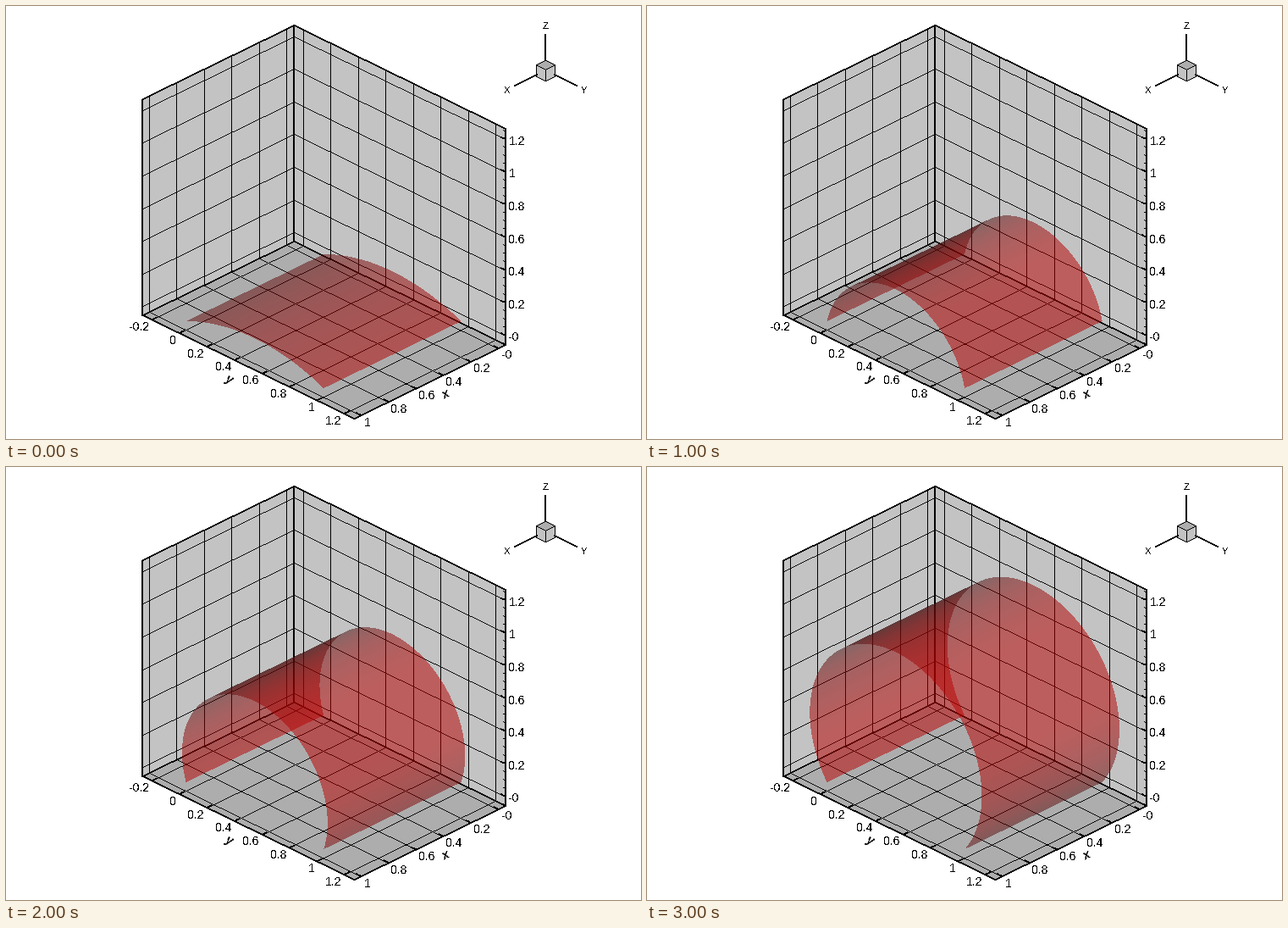
Animation, 750 px wide and 511 px high, one loop 4000 ms. Source, as a matplotlib script:

```python
import itertools

import numpy as np
import matplotlib.pyplot as plt
from matplotlib.animation import FuncAnimation

W, H, DPI = 750, 511, 100
PX = 72 / DPI
WALL, FLOOR = "#c3c3c3", "#adadad"

# Axonometric view: screen pixels per unit along each axis.
SX, SY, SZ = 162.5, 79.1, 193.0
AXES = np.array([[-SX, SY], [SX, SY], [0, -SZ]])
LOW = np.array([-0.053, -0.266, -0.056])
HIGH = np.array([1.0485, 1.2725, 1.265])
CORNER = np.array([340, 278])
TRIAD = np.array([637, 76])
STEP = 0.2


def project(point):
    return CORNER + (np.asarray(point) - LOW) @ AXES


fig = plt.figure(figsize=(W / DPI, H / DPI), dpi=DPI, facecolor="white")
ax = fig.add_axes([0, 0, 1, 1])
ax.axis("off")
ink = np.zeros((H, W), bool)


def line(start, end, width=1):
    """Mark a hard-edged line, thickened across its minor direction."""
    start, end = np.rint(start), np.rint(end)
    span = np.abs(end - start)
    cells = np.rint(np.linspace(start, end, int(span.max()) + 1)).astype(int)
    across = np.array([0, 1] if span[0] >= span[1] else [1, 0])
    for k in range(width):
        x, y = (cells - k * across).T
        ink[y, x] = True


def segment(start, end, width=1):
    line(project(start), project(end), width)


def face(points, color):
    ax.fill(*np.transpose(points), color=color, lw=0, antialiased=False, snap=False)


def text(content, x, y, size=14, ha="center", **style):
    ax.text(x, y + 0.36 * size, content, fontsize=size * PX, ha=ha, va="baseline",
            family="Liberation Sans", antialiased=False, **style)


def ticks(axis, step=STEP):
    return step * np.arange(np.ceil(LOW[axis] / step), np.floor(HIGH[axis] / step) + 1)


def at(axis, value, base):
    point = np.array(base, float)
    point[axis] = value
    return point


def draw_box():
    # Each pair of axes spans one back plane through the hidden corner.
    for a, b in itertools.combinations(range(3), 2):
        ends = at(a, HIGH[a], LOW), at(b, HIGH[b], LOW)
        far = at(b, HIGH[b], ends[0])
        face([project(p) for p in (LOW, ends[0], far, ends[1])],
             FLOOR if b == 1 else WALL)
        for end in ends:
            segment(LOW, end, 2)
            segment(end, far, 2)
        for u, v in ((a, b), (b, a)):
            for value in ticks(u):
                start = at(u, value, LOW)
                segment(start, at(v, HIGH[v], start))


def draw_scales():
    edges = [at(2, LOW[2], HIGH), at(2, LOW[2], HIGH), at(0, LOW[0], HIGH)]
    for axis, (edge, inward) in enumerate(zip(edges, (1, 0, 1))):
        side = -1 if axis == 1 else 1
        drop = 1 if axis == 2 else 7
        for value in ticks(axis):
            start = at(axis, value, edge)
            segment(start, at(inward, start[inward] - 0.035, start), 2)
            x, y = project(start)
            text(f"{value:.2g}", x + 3 * side, y + drop,
                 ha="right" if side < 0 else "left")
    for value in ticks(2, STEP / 4):
        start = at(2, value, edges[2])
        segment(start, at(1, start[1] - 0.02, start))
    text("x", 519, 458, ha="center", weight="bold", style="italic", rotation=26)
    text("y", 263, 440, ha="center", weight="bold", style="italic", rotation=-26)


def draw_triad(size=0.07):
    for axis, name in enumerate("XYZ"):
        arm = AXES[axis]
        line(TRIAD + 0.06 * arm, TRIAD + 0.225 * arm, 2)
        text(name, *(TRIAD + 0.28 * arm), size=11.5)
        u, v = np.delete(AXES, axis, axis=0) * size / 2
        center = TRIAD + arm * size / 2
        corners = [center + u + v, center + u - v, center - u - v, center - u + v]
        face(corners, FLOOR if name == "Z" else WALL)
        for p, q in zip(corners, corners[1:] + corners[:1]):
            line(p, q)


def arch_layers(height):
    """Far and near sheets of a circular arch over 0 <= y <= 1, as RGBA."""
    radius = (0.25 + height**2) / (2 * height)
    center = height - radius
    half = np.arctan2(0.5, -center)
    ox, oy = project((0, 0, 0))
    px, py = np.meshgrid(np.arange(W) - ox, np.arange(H) - oy)

    # Every sight line meets the full cylinder at two angles.
    reach, tilt = np.hypot(2 * SY, SZ), np.arctan2(SZ, 2 * SY)
    u = (SY * px / SX + py - SY + SZ * center) / (radius * reach)
    hit = np.abs(u) <= 1
    turn = np.arccos(np.clip(u, -1, 1))
    facing = np.sin(turn)
    red = 185 * np.minimum(1, 0.3 + 0.75 * facing) / 255
    gray = 18 * (1 - facing) / 255

    layers = []
    for angle in (2 * np.pi - turn - tilt, turn - tilt):
        x = 0.5 + radius * np.cos(angle) - px / SX
        inside = hit & (np.abs(angle - np.pi / 2) <= half) & (x >= 0) & (x <= 1)
        layers.append(np.dstack([red, gray, gray, 0.52 * inside]))
    return layers


def raster(zorder):
    return ax.imshow(np.zeros((H, W, 4)), interpolation="nearest", aspect="auto",
                     extent=(-0.5, W - 0.5, H - 0.5, -0.5), zorder=zorder)


draw_box()
draw_scales()
draw_triad()
raster(2).set_data(np.dstack([np.zeros((H, W, 3)), ink]))
sheets = [raster(3), raster(4)]
ax.set_xlim(-0.5, W - 0.5)
ax.set_ylim(H - 0.5, -0.5)


def update(step):
    for sheet, layer in zip(sheets, arch_layers(0.1 + 0.3 * step)):
        sheet.set_data(layer)
    return sheets


anim = FuncAnimation(fig, update, frames=4, interval=1000, repeat=True, repeat_delay=0)
plt.show()
```
